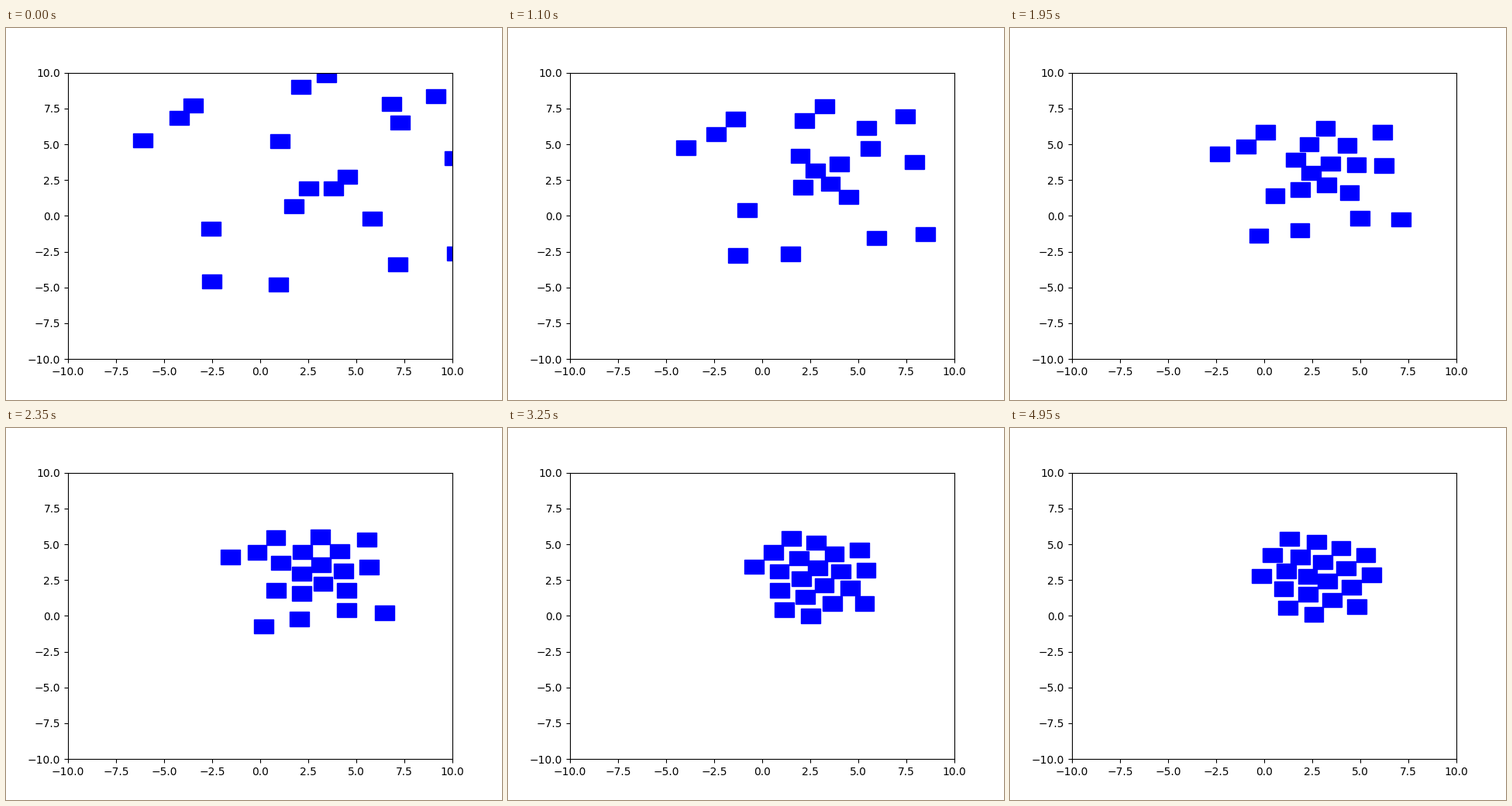
Recreate the animation shown at these times as a matplotlib script. Size 640x480 px, loop 5000 ms.

```python
import numpy as np
import matplotlib.pyplot as plt
from matplotlib.animation import FuncAnimation
from matplotlib.patches import Rectangle

FRAMES = 100
SIZE = 1.0
SPEED = 0.1    # pull towards the middle of the swarm, per frame
REACH = 1.5    # blocks closer than this repel each other
PUSH = 0.5     # share of the missing distance regained per frame

START = [(3.81, 1.92), (2.52, 1.92), (4.54, 2.73), (1.75, 0.67),
         (1.03, 5.22), (5.83, -0.19), (7.28, 6.52), (2.12, 9.00),
         (6.83, 7.81), (-2.56, -0.90), (3.45, 9.84), (7.16, -3.39),
         (10.10, 4.03), (-3.49, 7.71), (-4.21, 6.84), (0.95, -4.79),
         (9.13, 8.36), (-2.52, -4.58), (-6.11, 5.27), (10.22, -2.63)]


def pull(swarm, i):
    way = swarm.mean(axis=0) - swarm[i]
    return SPEED * way / max(np.hypot(*way), SPEED)


def push(swarm, i):
    gap = swarm[i] - np.delete(swarm, i, axis=0)
    dist = np.hypot(*gap.T)[:, None]
    return PUSH * (np.maximum(REACH - dist, 0) * gap / dist).sum(axis=0)


def simulate():
    swarm = np.array(START)
    poses = [swarm.copy()]
    while len(poses) < FRAMES:
        # one after another, so each block sees the moves made before it
        for i in range(len(swarm)):
            swarm[i] += pull(swarm, i) + push(swarm, i)
        poses.append(swarm.copy())
    return poses


poses = simulate()

fig, ax = plt.subplots(figsize=(6.4, 4.8), dpi=100)
ax.set_xlim(-10, 10)
ax.set_ylim(-10, 10)
blocks = [ax.add_patch(Rectangle((0, 0), SIZE, SIZE, color="blue"))
          for _ in START]


def draw(frame):
    for block, center in zip(blocks, poses[frame]):
        block.set_xy(center - SIZE / 2)
    return blocks


anim = FuncAnimation(fig, draw, frames=FRAMES, interval=50, repeat=True)
plt.show()
```
